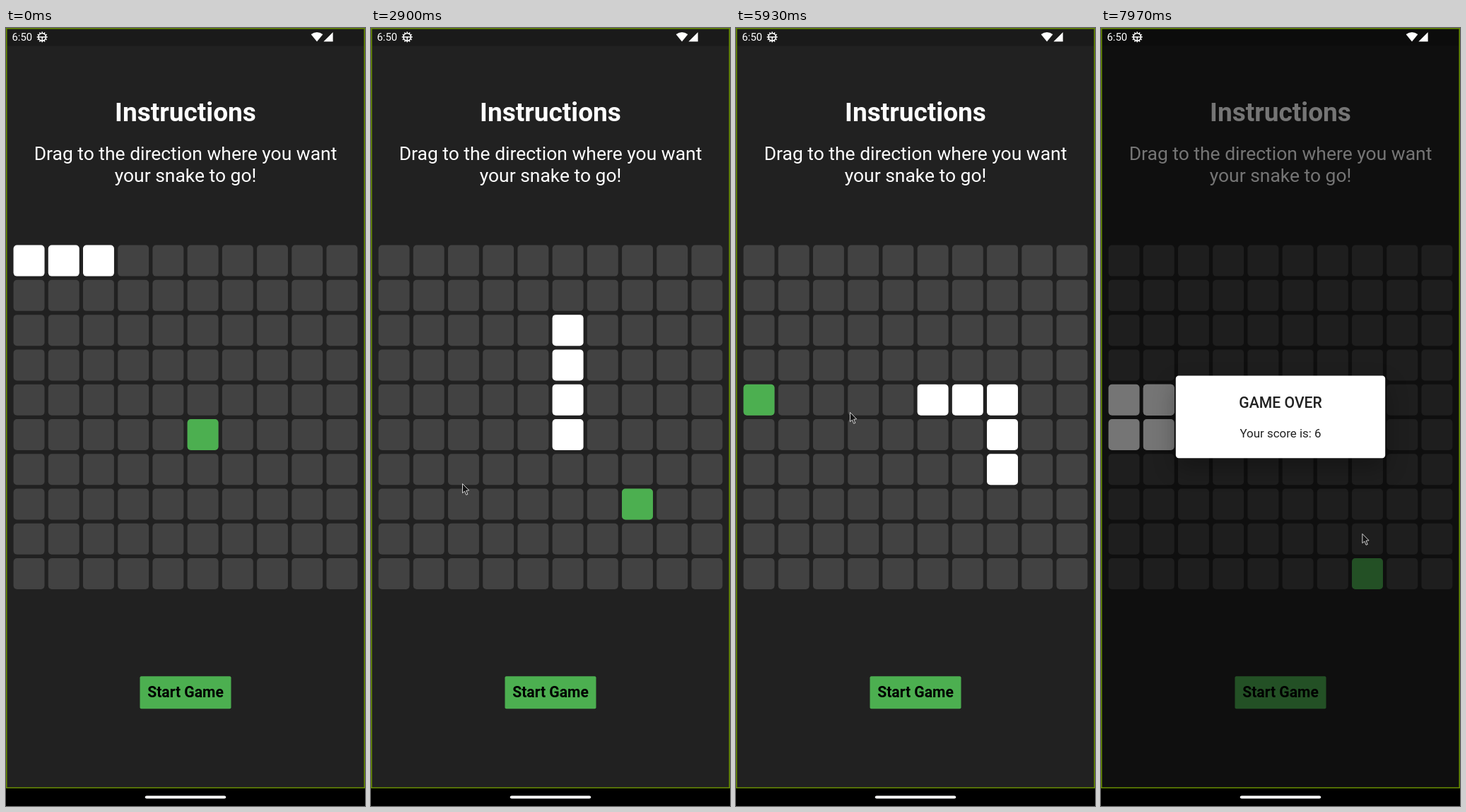
Recreate the animation shown at these times as an HTML page with a canvas. Size 508 by 1102 pixels, loop 8000 ms.

```html
<!DOCTYPE html>
<html lang="en">
<head>
<meta charset="utf-8">
<title>Snake</title>
<style>
  html, body { margin: 0; width: 100%; height: 100%; overflow: hidden; background: #000; }
  canvas { display: block; width: 508px; height: 1102px; }
</style>
</head>
<body>
<canvas id="stage" width="508" height="1102"></canvas>
<script>
const ctx = document.getElementById('stage').getContext('2d');
const LOOP = 8000;
const GREEN = '#4caf50';
const BUTTON = [189.5, 918.3, 129, 46, 2];

// Game: one move per tick, one meal whenever the head meets the food
const START = 1121, TICK = 201;
const MOVES = 'RRRDDDDDLLLDDRRRRRUUULLLLLLLDRU';
const DIRS = { R: [1, 0], L: [-1, 0], D: [0, 1], U: [0, -1] };
const FOODS = [[5, 5], [7, 7], [0, 4], [7, 9]];
const OVER = START + TICK * MOVES.length;

const path = [[0, 0], [1, 0], [2, 0]];
for (const m of MOVES) path.push(shift(path[path.length - 1], m, 1));

function shift([x, y], move, length) {
  const [dx, dy] = DIRS[move];
  return [x + dx * length, y + dy * length];
}

// Pointer: it presses the button, then swipes just before every turn
const PRESS = [257, 937];
const SWIPES = [
  { from: [305, 385], length: 200 }, { from: [410, 645], length: 281 },
  { from: [126, 645], length: 98 }, { from: [166, 727], length: 175 },
  { from: [391, 755], length: 247 }, { from: [402, 520], length: 240 },
  { from: [158, 610], length: 270 }, { from: [165, 860], length: 180 },
  { from: [345, 800], length: 280 }
];
const stops = [[30, [42, 722]], [670, PRESS], [START, PRESS]];
const turns = [...MOVES].map((m, i) => i).filter(i => i && MOVES[i] !== MOVES[i - 1]);
turns.forEach((turn, i) => {
  const { from, length } = SWIPES[i];
  const begin = START + TICK * turn;
  stops.push([begin, from], [begin + 170, shift(from, MOVES[turn], length)]);
});
stops.push([LOOP, [369.5, 717]]);

const clamp = p => Math.min(1, Math.max(0, p));
const smooth = p => p * p * (3 - 2 * p);
const easeOut = p => 1 - Math.pow(1 - p, 2.2);

function pointerAt(t) {
  const i = stops.findIndex(s => s[0] >= t);
  const [t0, a] = stops[i - 1] || stops[i], [t1, b] = stops[i];
  const e = t1 > t0 ? smooth((t - t0) / (t1 - t0)) : 0;
  return a.map((v, k) => v + (b[k] - v) * e);
}

function box(x, y, w, h, r, fill) {
  ctx.fillStyle = fill;
  ctx.beginPath();
  ctx.roundRect(x, y, w, h, r);
  ctx.fill();
}

function poly(points, fill) {
  ctx.fillStyle = fill;
  ctx.beginPath();
  points.forEach(([x, y]) => ctx.lineTo(x, y));
  ctx.closePath();
  ctx.fill();
}

function text(str, x, y, size, weight, fill, align = 'center') {
  ctx.font = `${weight} ${size}px Roboto, sans-serif`;
  ctx.textAlign = align;
  ctx.fillStyle = fill;
  ctx.fillText(str, x, y);
}

function cell([col, row], fill) {
  box(10.58 + col * 49.21, 307.6 + row * 49.27, 43.92, 44, 5, fill);
}

function drawBoard(t) {
  const n = Math.floor(clamp((t - START) / (OVER - START)) * MOVES.length + 1e-6);
  let eaten = 0;
  for (const [x, y] of path.slice(0, n + 3)) {
    const [fx, fy] = FOODS[eaten];
    if (x === fx && y === fy) eaten++;
  }
  for (let i = 0; i < 100; i++) cell([i % 10, Math.floor(i / 10)], '#424242');
  cell(FOODS[eaten], GREEN);
  path.slice(n - eaten, n + 3).forEach(c => cell(c, '#fff'));
}

function drawButton(t) {
  box(...BUTTON, GREEN);
  const p = (t - START) / 400;
  if (p > 0 && p < 1) {
    ctx.save();
    ctx.beginPath();
    ctx.roundRect(...BUTTON);
    ctx.clip();
    ctx.fillStyle = `rgba(0,0,0,${0.2 * (1 - p)})`;
    ctx.beginPath();
    ctx.arc(...PRESS, 15 + 65 * clamp(p * 1.8), 0, 7);
    ctx.fill();
    ctx.restore();
  }
  text('Start Game', 254, 948.4, 21.17, 700, '#000');
}

function drawDialog(t) {
  const e = easeOut(clamp((t - OVER) / 150));
  if (!e) return;
  ctx.fillStyle = `rgba(0,0,0,${0.54 * e})`;
  ctx.fillRect(0, 0, 508, 1077);
  ctx.save();
  ctx.globalAlpha = e;
  ctx.shadowColor = 'rgba(0,0,0,.3)';
  ctx.shadowBlur = 32;
  ctx.shadowOffsetY = 14;
  box(105.8, 492.6, 296.4, 116.7, 4.2, '#fff');
  ctx.shadowColor = 'transparent';
  text('GAME OVER', 254, 537.8, 21.17, 500, '#212121');
  text('Your score is: 6', 254, 579.7, 16.93, 400, '#212121');
  ctx.restore();
}

function drawGear(x, y) {
  const spoke = (a, r0, r1) => {
    ctx.moveTo(Math.cos(a) * r0, Math.sin(a) * r0);
    ctx.lineTo(Math.cos(a) * r1, Math.sin(a) * r1);
  };
  ctx.save();
  ctx.translate(x, y);
  ctx.strokeStyle = '#fff';
  ctx.lineWidth = 1.5;
  ctx.beginPath();
  ctx.arc(0, 0, 5.3, 0, 7);
  for (let i = 0; i < 12; i++) spoke(i * Math.PI / 6, 5.5, 7.5);
  for (let i = 0; i < 3; i++) spoke(i * Math.PI / 2, 0, 5);
  ctx.stroke();
  ctx.restore();
}

function drawSystemBars() {
  ctx.fillStyle = 'rgba(0,0,0,.2)';
  ctx.fillRect(0, 0, 508, 25.4);
  text('6:50', 8.5, 18.3, 14.8, 400, '#fff', 'left');
  drawGear(51.2, 12.8);
  ctx.fillStyle = '#fff';
  ctx.beginPath();
  ctx.moveTo(440, 19.3);
  ctx.lineTo(431.6, 9);
  ctx.quadraticCurveTo(440, 3, 448.4, 9);
  ctx.fill();
  poly([[449.3, 19.3], [462.6, 6], [462.6, 19.3]], '#fff');
  ctx.fillStyle = '#000';
  ctx.fillRect(0, 1077, 508, 25);
  box(196.8, 1087.4, 114.4, 4.2, 2.1, '#fff');
  ctx.strokeStyle = '#668c00';
  ctx.lineWidth = 1.5;
  ctx.strokeRect(0.75, 0.75, 506.5, 1075.5);
}

function drawPointer(t) {
  if (t < stops[0][0]) return;
  const [x, y] = pointerAt(t);
  ctx.save();
  ctx.translate(x + 0.5, y + 0.5);
  poly([[0, 0], [0, 13.2], [3, 10.6], [5.2, 15.8], [7.4, 14.9], [5.2, 9.8], [9.2, 9.4]], '#141414');
  ctx.strokeStyle = '#e8e8e8';
  ctx.lineWidth = 0.9;
  ctx.stroke();
  ctx.restore();
}

function draw(t) {
  ctx.fillStyle = '#212121';
  ctx.fillRect(0, 0, 508, 1102);
  text('Instructions', 254, 132.2, 37.04, 700, '#fff');
  text('Drag to the direction where you want', 254, 187, 26.46, 400, '#fff');
  text('your snake to go!', 254, 218, 26.46, 400, '#fff');
  drawBoard(t);
  drawButton(t);
  drawDialog(t);
  drawSystemBars();
  drawPointer(t);
}

const t0 = performance.now();
function tick() {
  draw((performance.now() - t0) % LOOP);
  requestAnimationFrame(tick);
}
tick();
</script>
</body>
</html>
```
